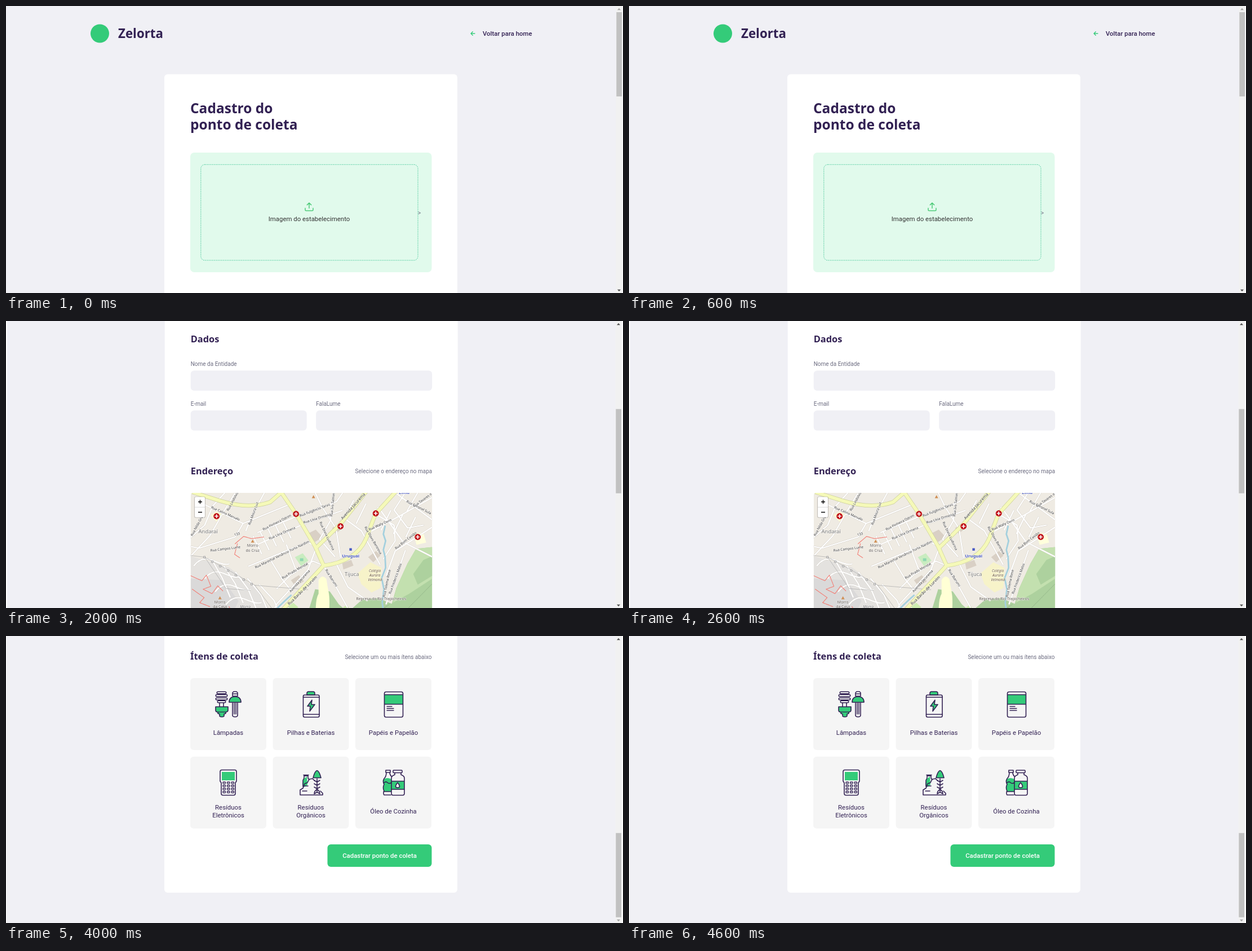
An HTML page that plays this animation: 1095x511 px, repeating every 5 s.

```html
<!DOCTYPE html>
<html lang="pt-BR">
<head>
<meta charset="utf-8">
<title>Cadastro do ponto de coleta</title>
<style>
  html, body { margin: 0; width: 100%; height: 100%; overflow: hidden; background: #fff; }
  svg { display: block; }
  text { font-family: Roboto, sans-serif; font-size: 11.4px; fill: #322153; }
  .title { font: 700 24.5px "Noto Sans", sans-serif; }
  .brand { font: 700 22.3px "Noto Sans", sans-serif; }
  .heading { font: 700 16.4px "Noto Sans", sans-serif; }
  .small { font-size: 10px; fill: #6c6c80; }
  .medium { font-weight: 500; }
  .select { font-family: "Liberation Sans", sans-serif; fill: #6c6c80; }
  .dark { fill: #333; }
  .white { fill: #fff; }
  .map text { font: 6.1px "Noto Sans", sans-serif; fill: #333; paint-order: stroke;
              stroke: #fffb; stroke-width: 1.2px; stroke-linejoin: round; }
  .map .main { font-size: 7.2px; }
  .map .area { font-size: 9.4px; fill: #777; }
  .map .hill { font-size: 6.8px; fill: #5d5650; }
  .map .faint { font-size: 6.8px; font-style: italic; fill: #777; }
  .map .school { font-size: 6.4px; font-style: italic; fill: #6b5631; }
  .map .metro { font-size: 7.6px; font-weight: 600; fill: #4a5bc4; }
  .map .river { font-size: 7.2px; font-style: italic; fill: #5c97c4; }
  .map .credit { font: 7.8px "Liberation Sans", sans-serif; stroke: none; }
  .line { fill: none; stroke-linecap: round; stroke-linejoin: round; }
  .icon { fill: none; stroke: #322153; stroke-width: 1.6; stroke-linejoin: round; stroke-linecap: round; }
  .icon .g { fill: #34cb79; }
  .icon .flat { fill: #34cb79; stroke: none; }
</style>
</head>
<body>
<svg id="stage" width="1095" height="511" viewBox="0 0 1095 511"></svg>
<script>
const rect = (x, y, w, h, fill, r = 0, more = '') =>
  `<rect x="${x}" y="${y}" width="${w}" height="${h}" rx="${r}" fill="${fill}" ${more}/>`;
const text = (s, x, y, cls = '', anchor = 'start') =>
  `<text x="${x}" y="${y}" class="${cls}" text-anchor="${anchor}">${s}</text>`;
const path = (d, cls = '', more = '') => `<path d="${d}" class="${cls}" ${more}/>`;
const line = (d, color, width, more = '') =>
  path(d, 'line', `stroke="${color}" stroke-width="${width}" ${more}`);
const fill = (d, color) => path(d, '', `fill="${color}"`);
const field = (x, y, w) => rect(x, y, w, 35.7, '#f0f0f5', 6);
const range = (n, draw) => Array.from({ length: n }, (_, i) => draw(i)).join('');

function header() {
  return '<circle cx="166.5" cy="49" r="16.5" fill="#34cb79"/>'
    + text('Zelorta', 199, 57, 'brand')
    + line('M832 49h-7m3.3-3.3L825 49l3.3 3.3', '#34cb79', 1.3)
    + text('Voltar para home', 846, 53, 'medium');
}

function upload() {
  return rect(327, 261, 428.5, 213, '#e1faec', 7)
    + rect(345.8, 282.3, 385.2, 170.5, 'none', 7, 'stroke="#4ecb9f" stroke-width=".9" stroke-dasharray="2 1.2"')
    + line('M531 360v3q0 1.5 1.5 1.5h11q1.5 0 1.5-1.5v-3M538 360v-9.5m-3.6 3.6l3.6-3.6 3.6 3.6', '#4ecb79', 1.5)
    + text('Imagem do estabelecimento', 538, 383, 'dark', 'middle')
    + text('&gt;', 731, 371.5, 'small');
}

function details() {
  return text('Dados', 327, 534.5, 'heading')
    + text('Nome da Entidade', 327, 577, 'small') + field(327, 585.3, 428.5)
    + text('E-mail', 327, 648, 'small') + field(327, 656.2, 206)
    + text('FalaLume', 549.5, 648, 'small') + field(549.5, 656.2, 206);
}

function address() {
  return text('Endereço', 327, 770.3, 'heading')
    + text('Selecione o endereço no mapa', 755.5, 768, 'small', 'end')
    + `<g class="map" transform="translate(0 710.5)" clip-path="url(#mapArea)">${map()}</g>`
    + text('Estado (UF)', 327, 1079, 'small') + field(327, 1086.5, 206)
    + text('Selecione uma UF', 344, 1108.5, 'select')
    + text('Cidade', 549.5, 1079, 'small') + field(549.5, 1086.5, 206)
    + text('Selecione uma cidade', 566.5, 1108.5, 'select');
}

const land = () => rect(327, 92, 429, 250, '#efebe3')
  + fill('M327 205L395 225 445 265 480 320 470 342H327Z', '#e4e2df')
  + fill('M327 245L385 248 412 285 385 342H327Z', '#dad9d9')
  + fill('M530 342L514 322 536 303 548 264 574 268 590 291 606 305 632 282 660 280 684 290 692 262 712 218 727 192 756 189V342Z', '#add19e')
  + fill('M692 262L712 218 727 192 756 189V245L715 272 686 288Z', '#c3e0af')
  + fill('M722 237L740 212 756 205V240L730 256Z', '#add19e')
  + range(34, i => line(`M${535 + (i * 67) % 216} ${308 + (i * 29) % 32}h2.5m-1.2 0v-2`, '#8fbd83', .7))
  + fill('M554 248q6-12 14-2q2 14 4 24t1 30q-12 7-24 1q0-20 5-29Z', '#ffffd5')
  + fill('M623 236L646 216 666 226 664 262 648 270 630 255Z', '#f7f3c9')
  + fill('M722 164l18 0 5 17-17 4Z', '#ffffdc')
  + fill('M362 132l14-8 9 8-12 12Z', '#fbf8d4')
  + fill('M512 207l14-7 10 13-13 10Z', '#c9ecc0') + rect(521, 209, 6, 5, '#8fd8b0')
  + fill('M590 303l12-10 6 3-9 12-7 1Z', '#cdebb0')
  + fill('M500 295l9-7 9 8-10 9Z', '#cdebb0')
  + fill('M535 165l14-7 12 13-13 9ZM596 218l16-6 4 10-18 7ZM642 207l14-11 8 8-13 12ZM505 248l14-9 9 11-15 9ZM578 155l11-6 6 8-11 8Z', '#d9d0c5');

function roads() {
  const side = [
    'M327 172L352 150 366 116 388 92M345 110L420 147 505 112M405 94L388 122 361 169 327 205M458 92L436 132 425 160',
    'M420 147L406 171 342 191 327 188M446 163L511 136 586 108 597 92M442 186L530 147 596 124M430 223L535 180 548 188',
    'M480 263L505 238 544 214 563 222M550 190L535 230 480 290 455 342M470 214L490 247 505 266M497 185L513 228',
    'M548 92L560 117 585 156 593 208M580 92L575 142 556 175 583 206M563 222L585 260 605 296M585 218L606 260 640 284',
    'M600 138L630 160 663 220M655 130L688 150 690 178 669 210M640 165L699 133 755 101M663 122L704 180 755 206',
    'M690 92L755 140M708 92L688 123 712 155 740 150M755 154L690 196 674 240M708 195L687 255 674 290M730 92L711 125'
  ];
  const parallel = range(5, i => `M${365 + i * 21} ${212 + i * 11}l${18 + i * 2} ${32 - i} 14 34 `)
    + range(6, i => `M${616 + i * 22} ${106 + i * 6}l-17 35 `)
    + range(5, i => `M${438 + i * 13} ${170 - i * 7}l15 31 `)
    + range(4, i => `M${333 + i * 19} ${222 + i * 23}q14-18 34-9t28 6 `);
  const major = 'M320 88L380 107Q430 122 468 109L492 88M484 86L514 130 548 188 563 222'
    + 'M645 82L593 148 550 190M452 342L500 290 563 222Q620 215 638 175L655 130 695 86';
  const minor = side.join('') + parallel;
  return line(minor, '#d2cdc5', 3) + line(minor, '#fff', 2.2)
    + line('M672 152l-3 14 4 12-4 16 3 12 1 20-7 18 4 20-3 24 3 20-9 34M428 342Q450 330 470 309T505 275', '#a4d0de', 2.8)
    + line('M327 204L352 207 394 230 441 257 487 320 510 342M352 207L390 263 433 266M441 257L535 265', '#aaa', .7)
    + range(7, i => rect(350 + i * 14, 205.5 + i * 8, 3, 3, '#eee', 0, 'stroke="#777" stroke-width=".6"'))
    + line(major, '#cccf9c', 7.2) + line(major, '#f5f9b8', 5.8)
    + line('M675 342L708 303 755 255M604 342L680 291', '#8daf85', .8, 'stroke-dasharray="3 1"')
    + line('M406 183l15-13 14 4 22-3M410 183l-5 19 9 6M327 240l20 9 8-10 8 20-14 5 16 8 10-14 9 9M330 264l21 15-8 9 18 7M395 295l9 14-12 6 5 13-18-3-9 12M440 300l10 9-4 17',
      '#f28078', 1.2, 'stroke-dasharray="2 1"');
}

function labels() {
  const streets = [
    ['Rua Celino Marvalo', 388, 131, 24], ['Rua Lindolvo', 403, 109, -62], ['Rua Moura Luz', 440, 130, -70],
    ['Rua Pinheira Odrim', 481, 147, -27], ['Rua Fulgêncio Tarvo', 548, 125, -21],
    ['Rua Lívia Ormena', 552, 140, -17], ['Rua Lívia Ormena', 490, 166, -23], ['133', 410, 168, -18],
    ['Rua Campos Lume', 389, 194, -7], ['Rua Marechal Venâncio Torto Nardim', 490, 204, -26],
    ['Rua Prado Mendal', 513, 233, -30], ['Avenida Jacurema', 522, 251, -48],
    ['Rua Barão de Lurvim', 527, 268, -45, 'main'], ['Avenida Jacurema', 617, 118, -48, 'main'],
    ['Rua Ibarumi', 575, 245, 58], ['Rua Dona Ludorina', 567, 170, 65], ['Rua Ivo Talmino', 581, 112, -84],
    ['Rua Wally Dorn', 664, 151, -24], ['Rua Olavo Bentreva', 649, 178, 60], ['Rua Bom Cestão', 710, 179, -38],
    ['Rua Coronel Sula', 731, 120, 27], ['Rua Tavares da', 741, 106, -36], ['Rua Tolema Rima', 677, 254, -78],
    ['Rua Frederico Malss', 692, 246, -70], ['Rua Nilda Grato', 341, 150, -62], ['Rio Itapurana', 464, 321, -42, 'river']
  ];
  const places = [
    ['Andaraí', 358, 164, 'area'], ['Tijuca', 613, 240, 'area'], ['Uruguai', 611, 207, 'metro'], ['Lima', 706, 94, 'metro'],
    ['Morro', 437, 188, 'hill'], ['do Cruz', 437, 197, 'hill'],
    ['Morro', 379, 289, 'hill'], ['da Casa', 379, 297.5, 'hill'], ['Branca', 379, 306, 'hill'], ['226 m', 379, 314.5, 'hill'],
    ['Morro', 424, 297, 'faint'], ['da Casa', 424, 305.5, 'faint'], ['Branca', 424, 314, 'faint'],
    ['Borel', 337, 315, 'faint'], ['Colégio', 654, 233, 'school'], ['Aurora', 654, 241, 'school'],
    ['Velmond', 654, 249, 'school'], ['Represa do Rio Trapicheiros', 665, 283, 'hill']
  ];
  return streets.map(([s, x, y, angle, cls = '']) =>
      `<g transform="translate(${x} ${y}) rotate(${angle})">${text(s, 0, 0, cls, 'middle')}</g>`).join('')
    + places.map(([s, x, y, cls]) => text(s, x, y, cls, 'middle')).join('');
}

function map() {
  const hospital = ([x, y]) => `<circle cx="${x}" cy="${y}" r="5.4" fill="#bf0a14"/>`
    + line(`M${x - 2.7} ${y}h5.4M${x} ${y - 2.7}v5.4`, '#fff', 1.7);
  const peak = ([x, y]) => fill(`M${x - 3} ${y + 3}l3-5.5 3 5.5Z`, '#d08f55');
  return land() + roads() + labels()
    + [[437, 178], [379, 279], [545, 99]].map(peak).join('')
    + rect(608.7, 191, 4.4, 4.4, '#4a5bc4')
    + [[373, 134], [514, 130], [593, 152], [655.5, 129], [730, 171]].map(hospital).join('')
    + rect(333.3, 99, 20, 38, '#0003', 3) + rect(334.3, 99.7, 18, 36.3, '#fff', 2)
    + line('M334.5 118h17.6', '#ccc', .7)
    + '<g id="zoom" stroke="#000" stroke-width="1.4"><path d="M340.3 108.5h7m-3.5-3.5v7"/><path id="minus" d="M340.3 127h7"/></g>'
    + rect(612, 330, 144, 12, '#fffb')
    + text('<tspan fill="#0078a8">Leaflet</tspan> | © <tspan fill="#0078a8">OpenStreetMap</tspan> contributors', 751.5, 338.3, 'credit', 'end');
}

const icons = [
  () => path('M376 101h13M374 106h17M374 112h17M377 117h11', '', 'stroke-width="5"')
    + path('M376 101h13M374 106h17M374 112h17M377 117h11', '', 'stroke="#f5f5f5" stroke-width="2"')
    + path('M379 119v7m7-7v7') + path('M372 126h22v6q0 3-4 3.5h-14q-4 0-4-3.5Z', 'g')
    + path('M376 136v2l3 1v3q0 2 4 2t4-2v-3l3-1v-2', 'g')
    + path('M402 107v-6l2-2h5l2 2v6ZM402 103h9M402 119v22q0 3 4.5 3t4.5-3v-22M405 119v20m3-20v20')
    + path('M396 118q0-10 10.5-10t10.5 10Z', 'g'),
  () => path('M534 105v-3q0-3 3-3h8q3 0 3 3v3Z', 'g')
    + rect(527.5, 105, 28.5, 39.5, 'none', 2.5) + path('M527.5 109h28.5M527.5 139.5h28.5')
    + path('M543 114l-8 11h5l-1 9 9-12h-6Z', 'g'),
  () => path('M671 105h33.5v16.5H671Z', 'flat') + rect(671.5, 99.5, 33, 45, 'none', 3)
    + path('M672 104.5h32M672 121.5h32M676 125.5h9M676 129h12M676 132.5h12', '', 'stroke-width="1.3"'),
  () => path('M383 242h23v15h-23Z', 'flat')
    + path('M383 238.5h23q3 0 3 3v17l-2 3v19q0 3-3 3h-19q-3 0-3-3v-19l-2-3v-17q0-3 3-3Z')
    + range(12, i => rect(385 + i % 3 * 7.5, 260 + Math.floor(i / 3) * 5.5, 4.5, 2.8, 'none', .8, 'stroke-width="1.3"')),
  () => path('M526 264l2-9 6-5 1 15-6 4Z', 'flat')
    + path('M522 283v-9l5-3 3-8 5-2 3-6 6-1 4 4M522 283h40v-3l-4-4M527 268v-11l2-4v-4h7v4l2 3M528 247.5h9M530 267h6m-10 9h8')
    + path('M552 239.5q4 1 7 13h-14q3-12 7-13Z', 'g')
    + path('M552 254v23m-5-20l5 3 5-3m-10 6l5 3 5-3m-10 6l5 3 5-3m-10 12q0-5 5-8 5 3 5 8l-5-3Z'),
  () => path('M670 255q7-4 14 0v22h-14Z', 'flat') + path('M684 259h23v14h-23Z', 'flat')
    + path('M674 239h8v4h-8ZM675 243q0 7-4 11-3 5 0 10-3 6 0 12-2 4 0 7h12M681 243q0 4 3 7M670 262q4-4 7-1t7 0M670 277h13')
    + rect(687, 239, 16, 4.5, 'none', 1)
    + path('M690 244v3q-6 2-6 6v27q0 3.5 3 3.5h17q3 0 3-3.5v-27q0-4-6-6v-3M684 258.5h23M684 273h23')
    + path('M695 261q-7 9 0 9t0-9Z', '', 'style="fill:#f5f5f5"')
];

function items() {
  const names = ['Lâmpadas', 'Pilhas e Baterias', 'Papéis e Papelão',
    'Resíduos Eletrônicos', 'Resíduos Orgânicos', 'Óleo de Cozinha'];
  const tile = i => {
    const x = 327 + i % 3 * 146.5, y = i < 3 ? 75 : 214.7, center = x + 67.5;
    const lines = names[i].startsWith('Resíduos') ? names[i].split(' ') : [names[i]];
    return rect(x, y, 135, 128, '#f5f5f5', 6) + `<g class="icon">${icons[i]()}</g>`
      + lines.map((s, n) => text(s, center, y + 101 + (n - (lines.length - 1) / 2) * 13.7, '', 'middle')).join('');
  };
  return text('Ítens de coleta', 327, 1200.5, 'heading')
    + text('Selecione um ou mais ítens abaixo', 755.5, 1199, 'small', 'end')
    + `<g transform="translate(0 1158.5)">${range(6, tile)}`
    + rect(570.5, 371, 185, 40, '#34cb79', 6)
    + text('Cadastrar ponto de coleta', 663, 395.3, 'medium white', 'middle') + '</g>';
}

const stage = document.getElementById('stage');
stage.innerHTML = `<defs><clipPath id="mapArea">${rect(327, 92.5, 428.5, 249, '#000', 5)}</clipPath></defs>`
  + rect(0, 0, 1094, 511, '#f0f0f5', 0, 'id="backdrop"')
  + `<g id="page">${rect(281, 121.5, 520, 1494, '#fff', 6)}${header()}`
  + text('Cadastro do', 327, 190.5, 'title') + text('ponto de coleta', 327, 220, 'title')
  + `${upload()}${details()}${address()}${items()}</g>`
  + `<g id="scrollbar">${rect(1082.5, 0, 11, 511, '#f1f1f1')}${rect(1083.3, 0, 9.7, 150, '#c1c1c1', 0, 'id="thumb"')}`
  + path('M1085 7.2h6l-3-3.4Z', '', 'id="up"') + path('M1085 504.8h6l-3 3.4Z', '', 'id="down"') + '</g>';

const set = (id, attrs) => {
  const node = document.getElementById(id);
  for (const name in attrs) node.setAttribute(name, attrs[name]);
};

// Each stop holds for one second: scroll position, left margin, page shift.
const stops = [[0, 0, 0], [213.5, 2, .7], [497, 2, .7], [710.5, 1, 0], [1158.5, 1, 0]];

function render() {
  const index = Math.floor(performance.now() % 5000 / 1000);
  const [scroll, margin, shift] = stops[index];
  set('page', { transform: `translate(${shift} ${-scroll})` });
  set('backdrop', { x: margin, width: (index ? 1093 : 1094) - margin });
  set('scrollbar', { transform: `translate(${index ? -1 : 0} 0)` });
  set('thumb', { y: 11 + scroll * .2933 });
  set('up', { fill: index === 0 ? '#a3a3a3' : '#505050' });
  set('down', { fill: index === 4 ? '#a3a3a3' : '#505050' });
  set('zoom', { 'stroke-width': index === 3 ? 1 : 1.4 });
  set('minus', { stroke: index === 3 ? '#888' : '#000' });
  requestAnimationFrame(render);
}
render();
</script>
</body>
</html>
```
